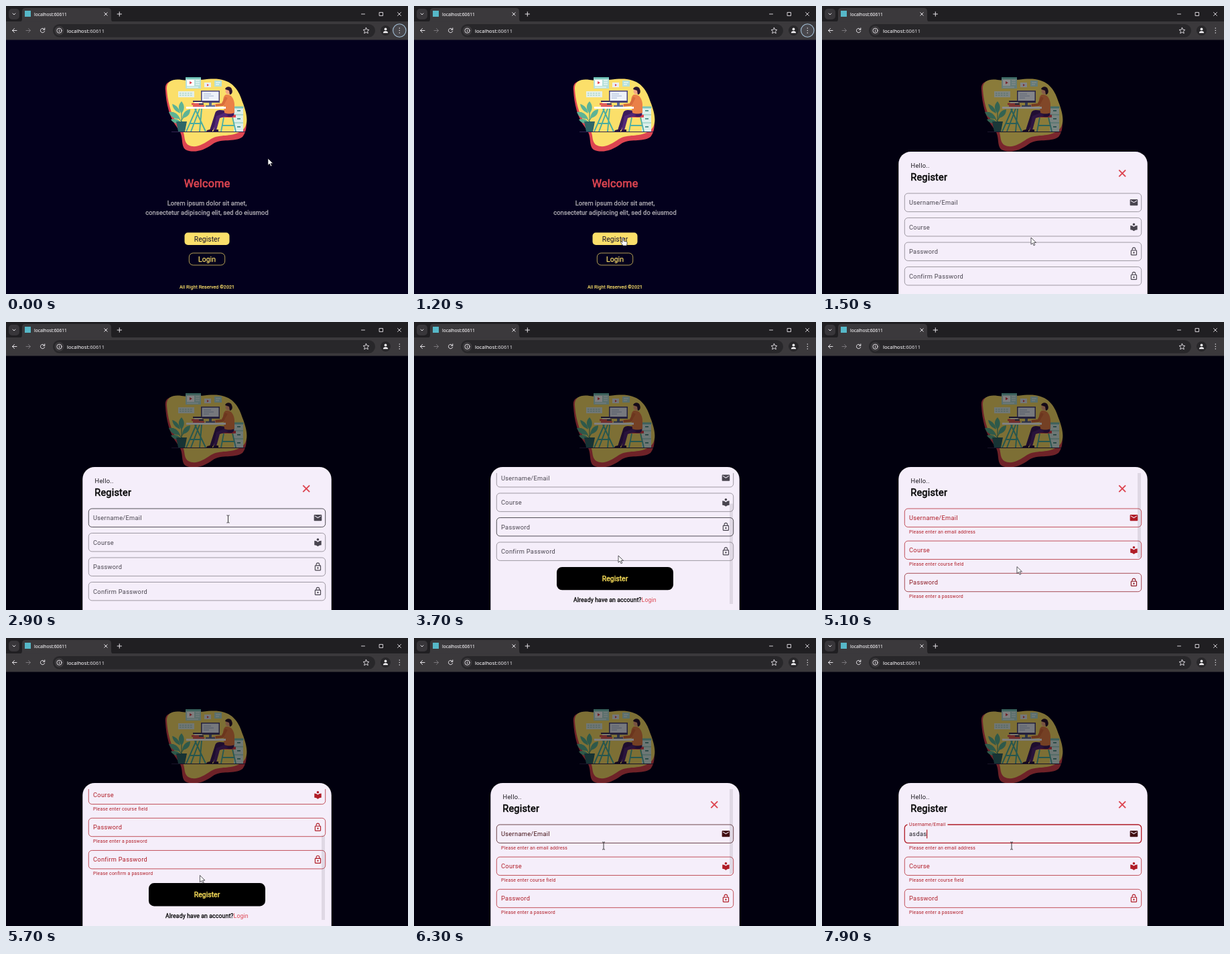
An HTML page that plays this animation: 600x429 px, repeating every 8000 ms.

```html
<!DOCTYPE html>
<html lang="en">
<head>
<meta charset="utf-8">
<title>Register form</title>
<style>
  html, body { margin: 0; width: 100%; height: 100%; overflow: hidden; background: #03001d; }
  svg { display: block; width: 600px; height: 429px; }
  text { font-family: Roboto, sans-serif; white-space: pre; }
  .ui { font-family: "Open Sans", "Noto Sans", sans-serif; fill: #f4f2f5; stroke: #f4f2f5; stroke-width: .12px; }
  .body { font-size: 9.28px; letter-spacing: .29px; }
  .para { font-size: 9.28px; letter-spacing: .13px; fill: #b3b0b6; stroke: #b3b0b6; stroke-width: .3px; }
  .btn { font-size: 10.4px; letter-spacing: .05px; }
  .foot { font-size: 8.7px; letter-spacing: .13px; }
  .label, .error { letter-spacing: .031em; }
  .error { font-size: 6.96px; fill: #b01c26; }
  .mid { text-anchor: middle; }
  .line { fill: none; stroke: #e6e3e8; stroke-linecap: round; stroke-linejoin: round; }
</style>
</head>
<body>
<svg viewBox="0 0 600 429">
  <defs>
    <clipPath id="view"><rect x="114" y="225" width="372" height="195"/></clipPath>
  </defs>

  <rect width="600" height="429" fill="#03001d"/>

  <!-- Illustration -->
  <path d="M238 126C236 113 245 110 260 112L345 135C358 155 364 182 353 195C340 204 322 196 308 206C296 215 280 220 268 214C260 208 266 194 257 183C244 168 239 145 238 126Z" fill="#dd4551"/>
  <path d="M240 124C239 112 249 108 262 110C285 113 300 107 318 109C340 112 348 127 353 143C361 163 363 180 350 187C334 196 320 190 306 198C294 206 283 213 272 207C263 200 270 190 259 179C246 165 241 140 240 124Z" fill="#fbdf6a"/>
  <g>
    <path d="M268 106h23v17h-23z" fill="#b5e0da"/>
    <path d="M268 106h23v2.500h-23z" fill="#6cbfb5"/>
    <path d="M270 110h11v9h-11z" fill="#fff"/>
    <path d="M274 112l4 2.300l-4 2.300z" fill="#dd4551"/>
    <path d="M283 111h6M283 114h6M283 117h6M270 121h17" stroke="#fff"/>
    <path d="M296 114h10v7h-10z" fill="#e9eef5"/>
    <path d="M300 116l3 1.700l-3 1.700z" fill="#dd4551"/>
    <path d="M311 111h11v9h-11z" fill="#b5e0da"/>
    <path d="M313 114h7M313 117h5" stroke="#fff"/>
    <path d="M257 127h24v9h-24z" fill="#e4efe9"/>
    <path d="M259 130h20M259 133h20" stroke="#8fcabd" stroke-dasharray="2.500 1.500"/>

    <path d="M340 150h14v37h-14z" fill="#dcefeb"/>
    <path d="M340 150h14v2h-14zM340 162h14M340 174h14" stroke="#7cc4b9" fill="#7cc4b9"/>
    <path d="M345 156h5M345 168h5M345 180h5" stroke="#2f7f78" stroke-width="1.300"/>
    <path d="M325 166l-4 21M338 166l5 21M323 178h18" fill="none" stroke="#4fb0a4" stroke-width="1.800"/>
    <path d="M320 162h23v4h-23z" fill="#dd4551"/>

    <path d="M340 157c2 8-3 9-9 8l-13-1l-9 21h-5l8-25c1-4 4-5 8-5z" fill="#3c1a5c"/>
    <path d="M332 163l-13 4l-5 18h-4l4-21l12-5z" fill="#532777"/>
    <path d="M299 187c1-3 4-3 9-3v3zM309 187c1-3 4-3 8-3v3z" fill="#28123d"/>
    <path d="M328 132c8-1 12 5 13 14v13c-5 2-11 2-15 0l-2-16c0-6 1-9 4-11z" fill="#ea8048"/>
    <path d="M329 136l-6 11l-11 1" fill="none" stroke="#d96d3c" stroke-width="4" stroke-linejoin="round"/>
    <path d="M313 146l-5 1v2l5 1z" fill="#f3a983"/>
    <circle cx="332" cy="127" r="4.500" fill="#f3a983"/>
    <path d="M327 124c1-5 9-5 10 0c2 4 0 8-3 8l-1-6z" fill="#2b1530"/>

    <path d="M291 126h28v18h-28z" fill="#4a4377"/>
    <path d="M292.500 127.500h25v13.500h-25z" fill="#eef2fb"/>
    <path d="M295 131h11M295 134h15M295 137h8" stroke="#a3b5d6"/>
    <path d="M303 144h4v4h5v2h-14v-2h5z" fill="#5a6791"/>
    <path d="M277 146h17M279 149h17" stroke="#dd4551" stroke-width="2.500"/>
    <path d="M279 142h13M288 146h7" stroke="#37305f" stroke-width="2"/>
    <path d="M281 144h12" stroke="#fff" stroke-width="1.500"/>
    <path d="M284 153l-15 34M282 153l16 34M289 153l-13 34M292 153l-3 34M274 175h18" fill="none" stroke="#4bada0" stroke-width="1.900"/>
    <path d="M269 150h59v3h-59z" fill="#fff"/>

    <path d="M262 173V150M262 172l-13-14M262 170l9-12" fill="none" stroke="#2a8478"/>
    <path d="M262 160c-6-7-5-13 0-18c5 6 5 12 0 18zM260 168c-9 1-14-3-17-10c9-1 14 3 17 10zM260 160c-7-3-11-7-12-14c7 2 11 7 12 14zM263 167c1-8 5-12 12-13c0 7-4 12-12 13zM261 174c-7 2-12 0-15-5c7-2 12 0 15 5z" fill="#5db395"/>
    <path d="M254 172h16l-3 15h-10z" fill="#2f6668"/>
    <path d="M247 187.500h110" stroke="#332650"/>
  </g>

  <!-- Landing page -->
  <text x="300.100" y="270.200" class="mid" font-size="16.100" letter-spacing=".29" fill="#dd4551" stroke="#dd4551" stroke-width=".65">Welcome</text>
  <text x="300" y="297.300" class="para mid">Lorem ipsum dolor sit amet,</text>
  <text x="300" y="310.800" class="para mid">consectetur adipiscing elit, sed do eiusmod</text>
  <rect x="266.500" y="337.500" width="67" height="18.500" rx="5" fill="#fbdf6a"/>
  <text x="300" y="350.500" class="btn mid" fill="#17132c">Register</text>
  <rect x="273.300" y="368" width="53.400" height="18" rx="6" fill="none" stroke="#fbdf6a" stroke-width=".7"/>
  <text x="300" y="380.700" class="btn mid" fill="#fbdf6a" stroke="#fbdf6a" stroke-width=".25">Login</text>
  <text x="300" y="420.800" class="mid" font-size="6.960" letter-spacing=".14" fill="#fbdf6a" stroke="#fbdf6a" stroke-width=".22">All Right Reserved ©2021</text>

  <rect id="dim" y="50" width="600" height="379"/>

  <!-- Bottom sheet -->
  <g id="sheet">
    <path d="M114.300 429V234a18 18 0 0 1 18-18H467.700a18 18 0 0 1 18 18V660H114.300z" fill="#f5eefa"/>
    <g clip-path="url(#view)">
      <g id="content">
        <text x="132.500" y="239.600" class="body" fill="#1d1b20">Hello..</text>
        <text x="132.300" y="258.800" font-size="14.500" letter-spacing=".2" stroke="#000" stroke-width=".5">Register</text>
        <path d="M443.300 243.300l9.800 9.800M453.100 243.300l-9.800 9.800" stroke="#dd4551" stroke-width="1.900"/>
        <g id="fields"></g>
        <g id="actions">
          <rect x="213" y="424.500" width="174" height="34.300" rx="8"/>
          <text x="300" y="445.400" class="btn mid" fill="#fbe05a" stroke="#fbe05a" stroke-width=".45">Register</text>
          <text x="238" y="476.800" class="foot" stroke="#000" stroke-width=".3">Already have an account?<tspan fill="#dd4551" stroke="none">Login</tspan></text>
        </g>
      </g>
      <rect id="thumb" x="471" width="5" fill="#1d1b20"/>
    </g>
  </g>

  <!-- Browser window -->
  <rect width="600" height="24" fill="#201f22"/>
  <rect y="23" width="600" height="27.500" fill="#3b393c"/>
  <path d="M20 23.500q4 0 4-4V8q0-5 5-5H152q5 0 5 5v11.500q0 4 4 4z" fill="#3b393c"/>
  <rect x="4" y="4" width="16" height="16" rx="5" fill="#38363a"/>
  <rect x="28" y="7" width="9" height="9" fill="#56b8c8"/>
  <text x="42" y="14.500" class="ui" font-size="6.700">localhost:60611</text>
  <g class="line">
    <path d="M10 11l2 2l2-2M146.800 9.800l4.400 4.400M151.200 9.800l-4.400 4.400M169.300 8.800v6.400M166.100 12h6.400"/>
    <path d="M530.500 12h5M557.500 9.500h5v5h-5zM584.500 9.500l5 5M589.500 9.500l-5 5" stroke-width=".9"/>
    <path d="M16 36.500H9.500M12.500 33.500l-3 3l3 3"/>
    <path d="M30 36.500h6.500M33.500 33.500l3 3l-3 3" stroke="#78757a"/>
    <path d="M57.500 35a3.200 3.200 0 1 0 .2 2.500M57.800 32.800v2.500h-2.500"/>
  </g>
  <rect x="70" y="27" width="481" height="19.500" rx="9.750" fill="#28272a"/>
  <circle cx="79.500" cy="36.700" r="7" fill="#3b393c"/>
  <g class="line" stroke-width=".9">
    <circle cx="79.500" cy="36.700" r="3.600"/>
    <path d="M79.500 36.500v1.700M79.500 34.900v.1M537.500 32.300l1.300 2.900l3.100.3l-2.300 2.100l.7 3.100l-2.800-1.600l-2.800 1.600l.7-3.100l-2.300-2.100l3.100-.3z"/>
  </g>
  <text x="91" y="39.500" class="ui" font-size="7.660">localhost<tspan fill="#cbc8cd" stroke="#cbc8cd">:60611</tspan></text>
  <circle cx="566.500" cy="36.500" r="7.500" fill="#28272a"/>
  <path d="M562.800 40.300c0-4.200 7.400-4.200 7.400 0z" fill="#f4f2f5"/>
  <circle cx="566.500" cy="34.400" r="1.900" fill="#f4f2f5"/>
  <circle id="ring" cx="587.300" cy="36.500" r="9.700" fill="#48474c" stroke="#a3bfd6" stroke-width="1.100"/>
  <path d="M587.300 33v.1M587.300 36.500v.1M587.300 40v.1" class="line" stroke-width="1.500"/>

  <g id="pointer">
    <path id="arrow" d="M0 0v10.200l2.400-2.200l1.700 3.800l1.700-.8l-1.700-3.600h3.400z" fill="#fff" stroke="#15131a" stroke-width=".7"/>
    <path id="beam" d="M-2-5.500h1.500l.5.500l.5-.5H2M0-5V5M-2 5.500h1.500L0 5l.5.500H2" fill="none" stroke="#222" stroke-width=".9"/>
    <path id="hand" d="M-1 1c0-1.500 2-1.500 2 0v4l4 1c1 .3 1.300 1 1.200 2l-.7 4H0l-3.300-4.500c-.8-1.200.5-2 1.300-1.200l1 1z" fill="#fff" stroke="#15131a" stroke-width=".7"/>
  </g>
</svg>
<script>
const LOOP = 8000, STEP = 100;
const OPEN = 1275, SUBMIT = 4100, FOCUS = 7200;
const GROW = 11.65;   // extra height of a field once its error shows
const $ = id => document.getElementById(id);

const lock = "M12 17c1.100 0 2-.9 2-2s-.9-2-2-2-2 .9-2 2 .9 2 2 2zm6-9h-1V6c0-2.760-2.240-5-5-5S7 3.240 7 6v2H6c-1.100 0-2 .9-2 2v10c0 1.100.9 2 2 2h12c1.100 0 2-.9 2-2V10c0-1.100-.9-2-2-2zM8.900 6c0-1.710 1.390-3.100 3.100-3.100s3.100 1.390 3.100 3.100v2H8.900V6zM18 20H6V10h12v10z";
const mail = "M20 4H4c-1.100 0-2 .9-2 2v12c0 1.100.9 2 2 2h16c1.100 0 2-.9 2-2V6c0-1.100-.9-2-2-2zm0 4-8 5-8-5V6l8 5 8-5z";
const book = "M12 11.550C9.640 9.350 6.480 8 3 8v11c3.480 0 6.640 1.350 9 3.550 2.360-2.190 5.520-3.550 9-3.550V8c-3.480 0-6.640 1.350-9 3.550zM12 8c1.660 0 3-1.340 3-3s-1.340-3-3-3-3 1.340-3 3 1.340 3 3 3z";
const specs = [
  ["Username/Email", "Please enter an email address", mail],
  ["Course", "Please enter course field", book],
  ["Password", "Please enter a password", lock],
  ["Confirm Password", "Please confirm a password", lock],
];

$("fields").innerHTML = specs.map(([label, error, icon], i) => `<g>
  <rect x="123.300" y="278" width="353.400" height="27.400" rx="5" fill="none"/>
  ${i ? "" : '<rect id="gap" x="127.500" y="276" height="4" fill="#f5eefa"/>'}
  <text class="label" x="130" y="295">${label}</text>
  <path class="icon" d="${icon}" transform="translate(458.500 284.700) scale(.58)"/>
  <text class="error" x="130" y="314.800">${error}</text>
</g>`).join("") +
  '<text id="typed" class="body" x="130" y="295" fill="#1d1b20"></text><path id="caret" d="M130.300 285.500v13" stroke="#b01c26" stroke-width="1.200"/>';

const fields = [...$("fields").querySelectorAll("g")].map(g => ({
  g, box: g.querySelector("rect"), label: g.querySelector(".label"),
  icon: g.querySelector(".icon"), error: g.querySelector(".error"),
}));

const outline = [130, 125, 134], ink = [29, 27, 32], grey = [73, 69, 79];
const red = [176, 28, 38], deepRed = [65, 14, 18];

// [time, x, y]
const pointerKeys = [[0, 391, 227], [900, 312, 345], [2000, 312, 345], [2600, 331.500, 293.500],
  [3400, 331.500, 293.500], [3700, 305, 348], [4000, 300, 381], [4900, 298, 381],
  [5100, 291, 364.500], [5500, 291, 364.500], [6200, 283, 309.500]];
// Wheel notches move the list at once: [time, offset]
const wheel = [[0, 0], [3200, 58], [3300, 59.500], [4700, 1.500], [4800, 0],
  [5600, 58], [5700, 106], [5900, 48], [6000, 0]];
// [field, from, to]
const hovers = [[1, 2100, 2300], [0, 2400, 3150], [2, 3250, 3750], [3, 3750, 3850],
  [3, 4150, 4650], [2, 4750, 5000], [0, 6100, LOOP]];

const clamp = v => Math.max(0, Math.min(1, v));
const mix = (a, b, p) => a.map((v, i) => v + (b[i] - v) * p);
const rgb = c => `rgb(${c.map(Math.round)})`;
const pulse = (t, from, to, fade) => clamp((t - from) / fade) * clamp(1 - (t - to) / fade);
const within = (t, ...spans) => spans.some(([a, b]) => t >= a && t < b);
const show = (id, on) => $(id).style.display = on ? "" : "none";
const set = (node, attrs) => { for (const k in attrs) node.setAttribute(k, attrs[k]); };
const shift = (node, x, y) => node.setAttribute("transform", `translate(${x} ${y})`);

function track(keys, t) {
  const a = keys.findLast(k => k[0] <= t), b = keys.find(k => k[0] > t) || a;
  const p = a === b ? 0 : (t - a[0]) / (b[0] - a[0]);
  return mix(a, b, p * p * (3 - 2 * p)).slice(1);
}

function drawFields(t, grow) {
  const err = clamp((t - SUBMIT + 50) / 150);
  const focus = t >= FOCUS, float = clamp((t - FOCUS) / 170);
  fields.forEach(({ g, box, label, icon, error }, i) => {
    const hover = Math.max(0, ...hovers.filter(h => h[0] === i).map(h => pulse(t, h[1], h[2], 150)));
    const hot = mix(red, deepRed, hover), active = focus && !i;
    shift(g, 0, i * (36.500 + grow));
    set(box, {
      stroke: rgb(active ? red : mix(mix(outline, ink, hover), hot, err)),
      "stroke-width": active ? 1.300 : .75,
    });
    label.style.fill = rgb(active ? red : mix(grey, hot, err));
    icon.style.fill = rgb(mix(grey, hot, err));
    error.style.opacity = err;
    const lift = i ? 0 : float;
    label.style.fontSize = 9.280 * (1 - lift / 4) + "px";
    label.setAttribute("y", 295 - 15 * lift);
  });
  $("gap").setAttribute("width", 60 * float);
  const typed = "asdas".slice(0, clamp((t - 7300) / 500) * 5);
  $("typed").textContent = typed;
  show("caret", focus);
  shift($("caret"), typed && $("typed").getComputedTextLength(), 0);
}

function draw(t) {
  const opened = clamp((t - OPEN) / 250), grow = t >= SUBMIT ? GROW : 0;
  show("ring", t < OPEN);
  $("dim").style.opacity = .5 * opened;
  show("sheet", opened > 0);
  shift($("sheet"), 0, 213 * (1 - opened) ** 2.300);

  const scroll = wheel.findLast(w => w[0] <= t)[1];
  shift($("content"), 0, -scroll);
  shift($("actions"), 0, 4 * grow);
  const ratio = 195 / (254.500 + 4 * grow);
  set($("thumb"), { y: 225 + scroll * ratio, height: 195 * ratio });
  $("thumb").style.opacity = .1 * Math.max(pulse(t, 3100, 3900, 300), pulse(t, 4600, 6600, 300));
  drawFields(t, grow);

  const beam = within(t, [2100, 2300], [2400, 3600], [4200, 5000], [6100, LOOP]);
  const hand = within(t, [800, 1400], [3900, 4200]);
  shift($("pointer"), ...track(pointerKeys, t));
  show("beam", beam);
  show("hand", hand);
  show("arrow", !beam && !hand);
}

const start = performance.now();
function tick() {
  const t = (performance.now() - start) % LOOP;
  draw(Math.floor(t / STEP) * STEP);
  requestAnimationFrame(tick);
}
tick();
</script>
</body>
</html>
```
